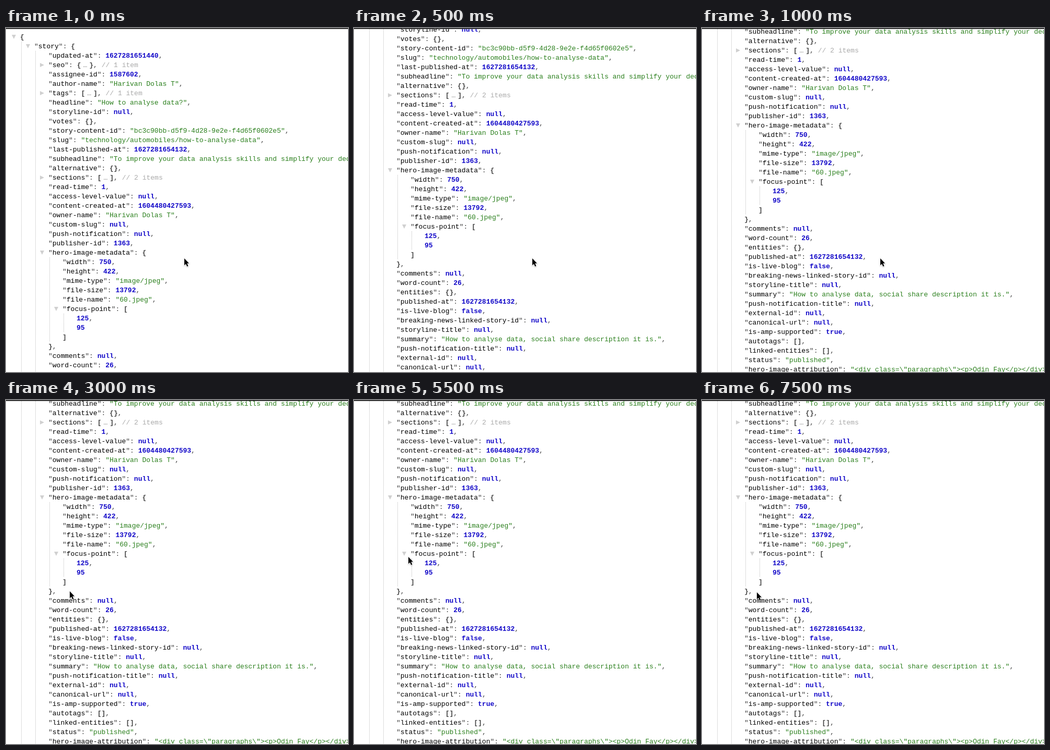
An HTML page that plays this animation: 654 px wide and 660 px high, repeating every 8 s.

```html
<!DOCTYPE html>
<html lang="en">
<head>
<meta charset="utf-8">
<title>JSON viewer</title>
<style>
html, body { margin: 0; width: 100%; height: 100%; overflow: hidden; background: #fff; }
svg { display: block; }
text { font: 13px "Liberation Mono", "Courier New", monospace; white-space: pre; fill: #444; }
.key { fill: #000; }
.str { fill: #2a7f1c; }
.lit { fill: #1208c8; font-weight: bold; }
.brk { font-weight: bold; }
.ell { fill: #777; }
.note { fill: #aaa; }
.fold { fill: #d0d0d0; }
.guide { stroke: #bbb; stroke-dasharray: 1 1; }
#pointer { filter: drop-shadow(0 1px 1px rgba(0, 0, 0, .25)); }
</style>
</head>
<body>
<svg width="654" height="660" viewBox="0 0 654 660">
  <g id="page"></g>
  <rect width="654" height="2" fill="#333"/>
  <g id="pointer">
    <path d="M1 1V14.2L4 11.4L6.2 16.6L8.4 15.7L6.2 10.6H10Z" fill="#000" stroke="#fff" stroke-width="1.4" paint-order="stroke"/>
  </g>
</svg>
<script>
const LOOP = 8000, TICK = 250, ROW = 18, INDENT = 27;
const page = document.getElementById('page');
const pointer = document.getElementById('pointer');

const source = String.raw`{
"story": {
"updated-at": 1627281651440,
"seo": {…}, // 1 item
"assignee-id": 1587602,
"author-name": "Harivan Dolas T",
"tags": […], // 1 item
"headline": "How to analyse data?",
"storyline-id": null,
"votes": {},
"story-content-id": "bc3c90bb-d5f9-4d28-9e2e-f4d65f0602e5",
"slug": "technology/automobiles/how-to-analyse-data",
"last-published-at": 1627281654132,
"subheadline": "To improve your data analysis skills and simplify your decisions",
"alternative": {},
"sections": […], // 2 items
"read-time": 1,
"access-level-value": null,
"content-created-at": 1604480427593,
"owner-name": "Harivan Dolas T",
"custom-slug": null,
"push-notification": null,
"publisher-id": 1363,
"hero-image-metadata": {
"width": 750,
"height": 422,
"mime-type": "image/jpeg",
"file-size": 13792,
"file-name": "60.jpeg",
"focus-point": [
125,
95
]
},
"comments": null,
"word-count": 26,
"entities": {},
"published-at": 1627281654132,
"is-live-blog": false,
"breaking-news-linked-story-id": null,
"storyline-title": null,
"summary": "How to analyse data, social share description it is.",
"push-notification-title": null,
"external-id": null,
"canonical-url": null,
"is-amp-supported": true,
"autotags": [],
"linked-entities": [],
"status": "published",
"hero-image-attribution": "<div class=\"paragraphs\"><p>Odin Fay</p></div>",`;

function add(parent, tag, attrs, content) {
  const el = document.createElementNS('http://www.w3.org/2000/svg', tag);
  for (const name in attrs) el.setAttribute(name, attrs[name]);
  if (content) el.textContent = content;
  return parent.appendChild(el);
}

const TOKEN = /"[\w-]+"(?=: )|"(?:\\.|[^"\\])*"|\/\/.*|\w+|…|[{}\[\]]|[:, ]+/g;

function drawText(line, x, y) {
  const text = add(page, 'text', { x, y });
  let gap = 0;
  const span = (kind, str) => {
    add(text, 'tspan', { class: kind, dx: gap }, str);
    gap = 0;
  };
  for (const { 0: part, index } of line.matchAll(TOKEN)) {
    if (part[0] === '"' && index === 0) {
      span('quote', '"');
      span('key', part.slice(1, -1));
      span('quote', '"');
    } else if (part[0] === '"') span('str', part);
    else if (part.startsWith('//')) span('note', part);
    else if (part === '…') {
      gap = 4;
      span('ell', part);
      gap = 4;
    } else if (/\w/.test(part)) span('lit', part);
    else span(/[{}\[\]]/.test(part) ? 'brk' : 'mark', part);
  }
}

function drawFold(depth, top, open) {
  const x = 11 + INDENT * depth, y = top + 5;
  const d = open ? `M${x} ${y}h8l-4 8z` : `M${x} ${y}v8l8 -4z`;
  add(page, 'path', { d, class: 'fold' });
}

function drawGuide(depth, from, to) {
  const x = 2.5 + INDENT * depth;
  add(page, 'path', { d: `M${x} ${from}V${to}`, class: 'guide' });
}

const lines = source.split('\n');
const starts = [];
lines.forEach((line, i) => {
  const top = 8 + i * ROW;
  if (/^[}\]]/.test(line)) drawGuide(starts.length, starts.pop(), top);
  const depth = starts.length;
  drawText(line, INDENT * (depth + 1), top + 13);
  const open = /[{\[]$/.test(line);
  if (open) starts.push(top + ROW);
  if (open || line.includes('…')) drawFold(depth, top, open);
});
starts.forEach((from, i) => drawGuide(i + 1, from, 8 + lines.length * ROW));

// Key points are [ms, x, y]; motion between them advances once per tick.
function play(el, points) {
  const last = points[points.length - 1];
  const path = [...points, [LOOP, last[1], last[2]]];
  const frames = path.map(([t, x, y], i) => {
    const ticks = i + 1 < path.length ? (path[i + 1][0] - t) / TICK : 1;
    return { offset: t / LOOP, transform: `translate(${x}px, ${y}px)`, easing: `steps(${ticks})` };
  });
  el.animate(frames, { duration: LOOP, iterations: Infinity });
}

play(page, [[0, 0, 0], [250, 0, -103], [750, 0, -213], [1000, 0, -244]]);

play(pointer, [
  [0, 340, 441], [1250, 340, 441], [2250, 204, 288], [2500, 262, 275],
  [3000, 121, 366], [3750, 106, 321], [4500, 73, 192], [5000, 97, 286],
  [5500, 103, 300], [6000, 112, 315], [6250, 110, 314], [7500, 104, 368]
]);
</script>
</body>
</html>
```
